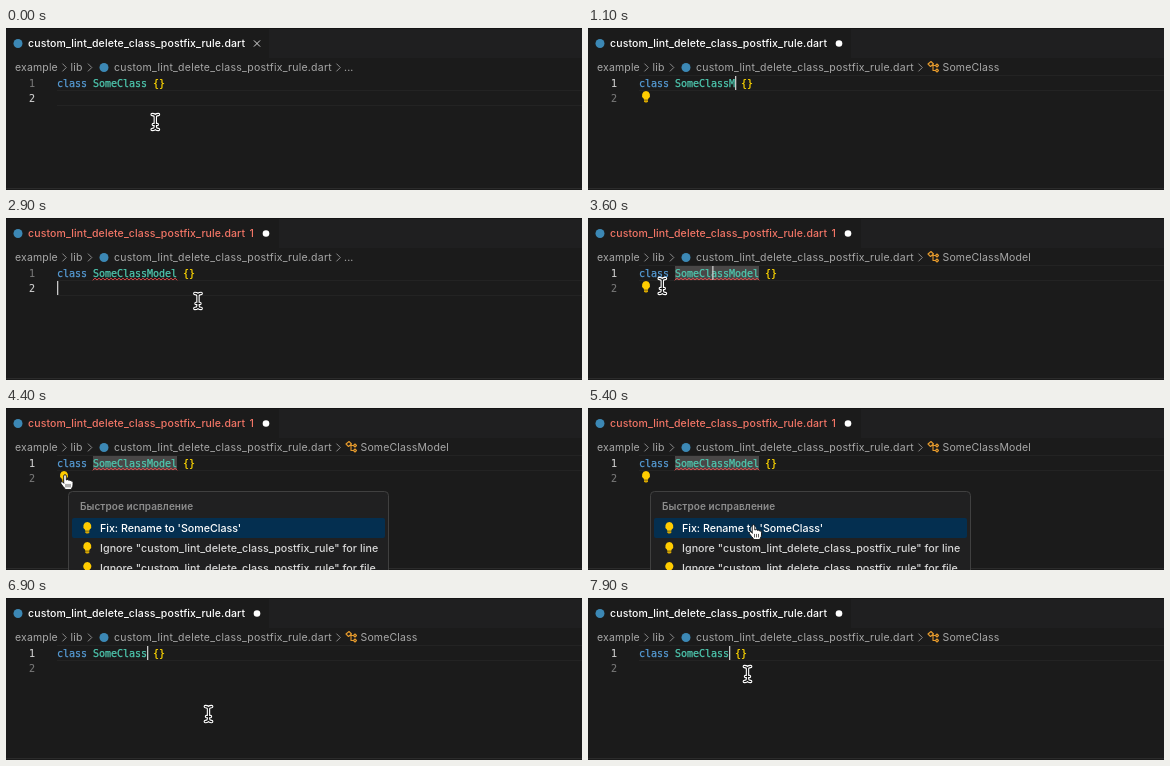
Animation, 576 px wide and 162 px high, one loop 8 s. Source, as an HTML page:

```html
<!DOCTYPE html>
<html lang="ru">
<head>
<meta charset="utf-8">
<title>Quick fix in a code editor</title>
<style>
  html, body { margin: 0; width: 100%; height: 100%; overflow: hidden; background: #1b1b1b; }
  svg { display: block; width: 576px; height: 162px; }
  text { font: 10.5px Inter, "Open Sans", sans-serif; letter-spacing: .15px; fill: #a8a8a8; white-space: pre; }
  .file { letter-spacing: .24px; }
  .tab { font-weight: 500; letter-spacing: .13px; fill: #fff; }
  .error .tab { fill: #f27566; }
  .code { font: 10px "DejaVu Sans Mono", "Liberation Mono", monospace; letter-spacing: -.02px;
    fill: currentColor; stroke: currentColor; stroke-width: .25px; }
  .num { color: #787878; stroke-width: .1px; }
  .num.on { color: #d0d0d0; }
  .key { color: #569cd6; }
  .type { color: #4ec9b0; }
  .brace { color: #ffd700; }
  .key, .type, .brace { fill: currentColor; stroke: currentColor; }
  .menu text { font-size: 10.7px; font-weight: 500; letter-spacing: .05px; fill: #d8d8d8; }
  .menu .head { font-size: 10px; font-weight: 600; letter-spacing: .08px; fill: #8d8d8d; }
  .menu .picked { letter-spacing: -.03px; fill: #fff; }
  #tip text { letter-spacing: .14px; }
  .line { fill: none; stroke-linecap: round; stroke-linejoin: round; }
</style>
</head>
<body>
<svg viewBox="0 0 576 162">
  <defs>
    <path id="chevron" class="line" d="M-1.8 -3.6L1.8 0L-1.8 3.6" stroke="#8c8c8c"/>
    <g id="bulb">
      <path d="M0 -5.5A4.2 4.2 0 0 1 2.4 2L2 3.2H-2L-2.4 2A4.2 4.2 0 0 1 0 -5.5Z" fill="#ffcc00"/>
      <path d="M-2 3.8H2V5L1 6H-1L-2 5Z" fill="#d9a800"/>
    </g>
    <path id="beamShape" class="line" d="M-3.2 -7.5Q0 -7.5 0 -5V5Q0 7.5 -3.2 7.5M3.2 -7.5Q0 -7.5 0 -5V5Q0 7.5 3.2 7.5M-2 2.5H2"/>
  </defs>

  <rect width="576" height="162" fill="#1b1b1b"/>

  <!-- Tab bar -->
  <rect id="strip" width="576" height="30" fill="#1f1f20"/>
  <rect width="576" height="1" fill="#141414"/>
  <circle cx="12" cy="15.5" r="4.5" fill="#3c88b5"/>
  <g id="tab">
    <text class="tab" x="22" y="19">custom_lint_delete_class_postfix_rule.dart</text>
    <text class="tab" id="count" x="243.5" y="19">1</text>
  </g>
  <path id="close" class="line" d="M248.2 12.7L253.8 18.3M253.8 12.7L248.2 18.3" stroke="#dcdcdc"/>
  <circle id="dirty" cy="15.5" r="3.3" fill="#fff"/>

  <!-- Breadcrumbs -->
  <text x="9" y="43">example</text>
  <use href="#chevron" x="58.5" y="39.5"/>
  <text x="64.5" y="43">lib</text>
  <use href="#chevron" x="84" y="39.5"/>
  <circle cx="98" cy="39.5" r="4.5" fill="#3c88b5"/>
  <text class="file" x="108" y="43">custom_lint_delete_class_postfix_rule.dart</text>
  <use href="#chevron" x="332.5" y="39.5"/>
  <g id="symbol" class="line" stroke="#e59a2c" stroke-width="1.1" transform="translate(-.5 0)">
    <path d="M340.5 36L343.5 33.5L346 36L343 38.5ZM344.5 37.5H348M345.5 37.5V42.5H348M348 37.5L349.5 36L351 37.5L349.5 39ZM348 42.5L349.5 41L351 42.5L349.5 44Z"/>
  </g>
  <text id="crumb" y="43"></text>

  <!-- Editor -->
  <path id="row" d="M51 .5H576M51 15.5H576" stroke="#232323"/>
  <rect id="mark" x="87" y="48" width="84" height="14" fill="#494747"/>
  <text class="code num" id="n1" x="23" y="59">1</text>
  <text class="code num" id="n2" x="23" y="74">2</text>
  <text class="code" x="51" y="59"><tspan class="key">class </tspan><tspan class="type" id="name"></tspan><tspan class="brace"> {}</tspan></text>
  <path id="squiggle" class="line" stroke="#f14c4c" stroke-width=".9"/>
  <use id="hint" href="#bulb" x="58" y="68.5"/>
  <rect id="caret" width="1.3" height="14" fill="#c8c8c8"/>
  <rect y="160" width="576" height="1" fill="#2b2b2b"/>

  <!-- Quick fix menu -->
  <g id="menu" class="menu">
    <rect x="62.5" y="83.5" width="320" height="90" rx="4" fill="#202021" stroke="#404040"/>
    <text class="head" x="74" y="102">Быстрое исправление</text>
    <rect x="66" y="110" width="313" height="20" rx="2" fill="#042f50"/>
    <use href="#bulb" x="81.3" y="119.5"/>
    <use href="#bulb" x="81.3" y="139.5"/>
    <use href="#bulb" x="81.3" y="159.5"/>
    <text class="picked" x="94" y="124">Fix: Rename to 'SomeClass'</text>
    <text x="94" y="144">Ignore "custom_lint_delete_class_postfix_rule" for line</text>
    <text x="94" y="164">Ignore "custom_lint_delete_class_postfix_rule" for file</text>
  </g>
  <g id="tip" class="menu">
    <rect x="201.5" y="135.5" width="211" height="40" rx="2" fill="#212122" stroke="#454545"/>
    <text x="207" y="148">Enter, чтобы применить, ⌘Enter для</text>
    <text x="207" y="162">предварительного просмотра</text>
  </g>

  <!-- Pointers -->
  <g id="beam">
    <use href="#beamShape" stroke="#fff" stroke-width="3.4"/>
    <use href="#beamShape" stroke="#111" stroke-width="1.2"/>
  </g>
  <g id="hand">
    <path class="line" style="fill:#fff" stroke="#111" stroke-width=".9" d="M-1.3 7V1Q-1.3 -.3 0 -.3Q1.3 -.3 1.3 1V5Q3.2 3.8 3.6 5.3Q5.6 4.4 6 6Q8 5.3 8 7.3V10Q8 12 6.7 13.2V14.6H-.3V13.2Q-2 11.8 -4 8.7Q-4.7 7.2 -3.3 6.7Q-2.2 6.4 -1.3 8Z"/>
    <path class="line" stroke="#333" stroke-width=".8" d="M1 9.3V12M3 9.3V12M5 9.3V12"/>
  </g>
</svg>
<script>
  const LOOP = 8000;
  const $ = id => document.getElementById(id);
  const show = (id, on) => $(id).style.display = on ? '' : 'none';
  const set = (id, name, value) => $(id).setAttribute(name, value);
  const within = (t, from, to) => t >= from && t < to;

  // Each step is [start, value].
  const at = (steps, t) => steps.reduce((v, [start, value]) => t >= start ? value : v, steps[0][1]);

  const names = [[0, 'SomeClass'], [1000, 'SomeClassM'], [1300, 'SomeClassMo'], [1400, 'SomeClassMod'],
    [1600, 'SomeClassMode'], [1700, 'SomeClassModel'], [6500, 'SomeClass']];
  const crumbs = [[0, '...'], [700, 'SomeClass'], [1900, 'SomeClassModel'], [2600, '...'],
    [3400, 'SomeClassModel'], [6700, 'SomeClass'], [7200, '...'], [7600, 'SomeClass']];
  const activeLine = [[0, 2], [600, 1], [2500, 2], [3300, 1], [7100, 2], [7500, 1]];

  // Caret column; every step also restarts the blink.
  const carets = [[-500, 0], [600, 15], [1000, 16], [1300, 17], [1400, 18], [1600, 19], [1700, 20],
    [2500, 0], [3300, 12.2], [6500, 15], [7100, 0], [7500, 15]];

  // Pointer hotspot: [time, x, y]
  const path = [[0, 149.3, 94], [100, 149.3, 94], [500, 142, 58], [2200, 142, 58], [2200, 217.3, 133],
    [2400, 217.3, 133], [3000, 190, 79], [3250, 125, 57], [3350, 125, 57], [3600, 74.3, 68],
    [3800, 59, 67], [4400, 59, 67], [4800, 165.5, 117], [5400, 165.5, 117], [5700, 202.5, 117],
    [7100, 202.5, 116], [7450, 143, 57], [7550, 143, 57], [7850, 159.5, 76], [LOOP, 159.5, 76]];

  const ease = u => u * u * (3 - 2 * u);

  function pointerAt(t) {
    const i = path.findIndex(p => p[0] > t);
    const [t0, x0, y0] = path[i - 1], [t1, x1, y1] = path[i];
    const u = ease((t - t0) / (t1 - t0));
    return [x0 + (x1 - x0) * u, y0 + (y1 - y0) * u];
  }

  function drawCaret(t, line, menuOpen) {
    const start = at(carets.map(([s]) => [s, s]), t);
    set('caret', 'x', 51 + at(carets, t) * 6);
    set('caret', 'y', line === 1 ? 48 : 63);
    show('caret', !menuOpen && (t - start) % 1000 < 500 && t >= 600);
  }

  function drawPointer(t) {
    const [x, y] = pointerAt(t);
    const hand = within(t, 3750, 6500);
    const visible = !within(t, 1000, 2200);
    show('beam', visible && !hand);
    show('hand', visible && hand);
    set(hand ? 'hand' : 'beam', 'transform', `translate(${x} ${y})`);
  }

  function render(t) {
    const line = at(activeLine, t);
    const crumb = at(crumbs, t);
    const error = within(t, 2000, 6800);
    const menuOpen = within(t, 4400, 6500);
    const edited = t >= 1000;

    $('name').textContent = at(names, t);
    $('crumb').textContent = crumb;
    set('crumb', 'x', crumb === '...' ? 338 : 354.5);
    show('symbol', crumb !== '...');

    set('tab', 'class', error ? 'error' : '');
    show('count', error);
    set('strip', 'x', error ? 273 : 263);
    show('close', !edited);
    show('dirty', edited);
    set('dirty', 'cx', error ? 260 : 251);

    $('n1').classList.toggle('on', line === 1);
    $('n2').classList.toggle('on', line === 2);
    set('row', 'transform', `translate(0 ${line === 1 ? 47 : 62})`);
    show('hint', within(t, 850, 2500) || within(t, 3500, 6500));
    show('mark', within(t, 3450, 6500));
    show('squiggle', within(t, 2000, 6500));
    show('menu', menuOpen);
    show('tip', within(t, 6100, 6500));

    drawCaret(t, line, menuOpen);
    drawPointer(t);
  }

  set('squiggle', 'd', 'M87 62' + 'l2 -1.8l2 1.8'.repeat(21));

  const began = performance.now();
  function tick() {
    render((performance.now() - began) % LOOP);
    requestAnimationFrame(tick);
  }
  tick();
</script>
</body>
</html>
```
